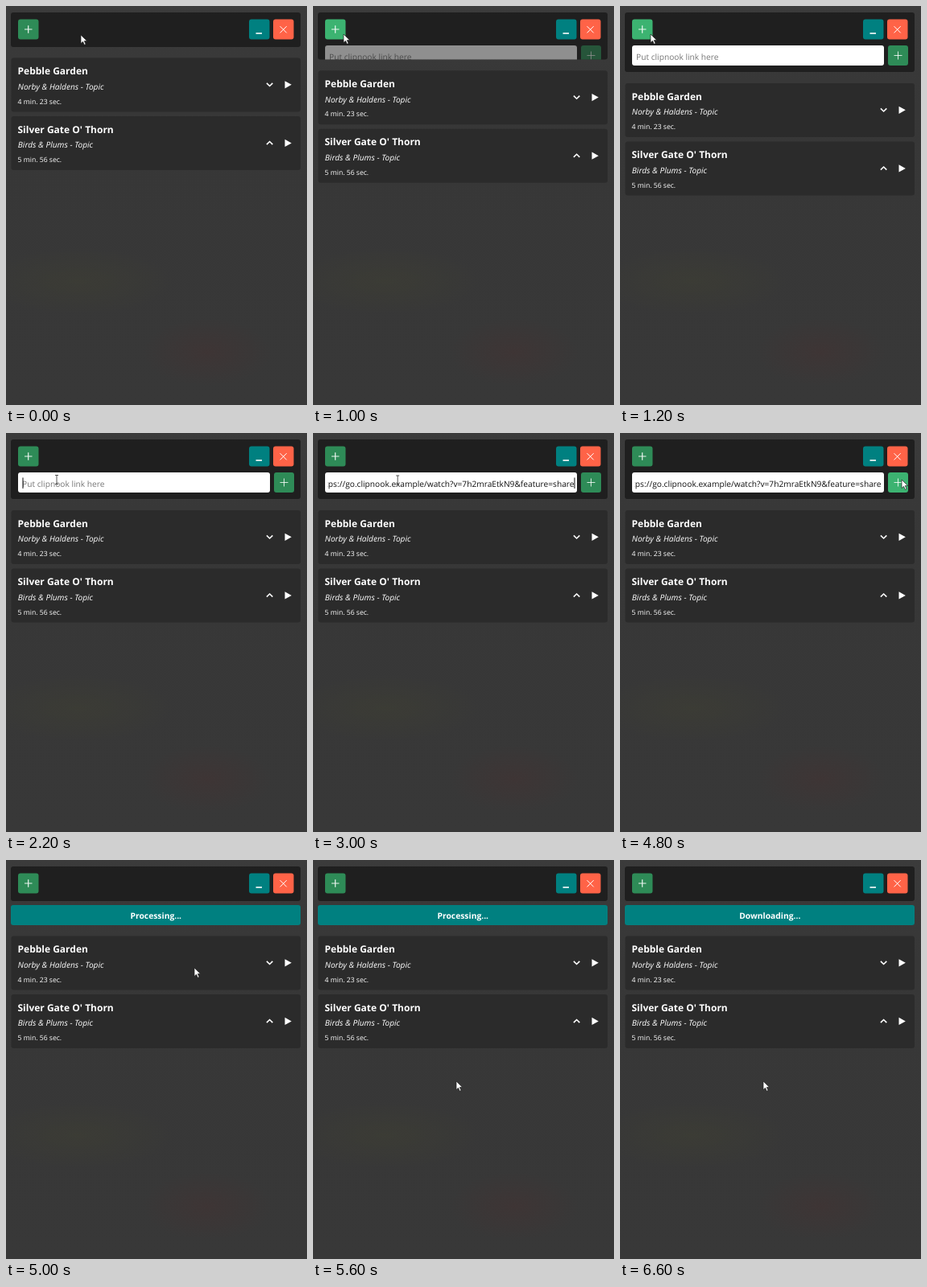
An HTML page that plays this animation: 374 by 496 pixels, repeating every 8 s.

```html
<!DOCTYPE html>
<html lang="en">
<head>
<meta charset="utf-8">
<title>Playlist</title>
<style>
  html, body { margin: 0; width: 100%; height: 100%; overflow: hidden; background: #373737; }
  svg { display: block; width: 374px; height: 496px; text-rendering: geometricPrecision;
        font-family: "Open Sans", "Noto Sans", sans-serif; }
  .line { fill: none; stroke: #fff; stroke-width: 1.2; }
  .title { font-size: 12px; font-weight: 700; }
  .artist { font-size: 10.15px; font-style: italic; }
  .time { font-size: 8.65px; }
  .field { font-size: 10.2px; }
  .banner { font-size: 10.3px; font-weight: 700; text-anchor: middle; }
</style>
</head>
<body>
<svg viewBox="0 0 374 496">
  <defs>
    <linearGradient id="shade" x1="0" y1="0" x2="0" y2="1">
      <stop offset="0" stop-color="#3b3b3b"/>
      <stop offset=".25" stop-color="#373737"/>
      <stop offset="1" stop-color="#383838"/>
    </linearGradient>
    <radialGradient id="olive">
      <stop stop-color="#44452f" stop-opacity=".3"/>
      <stop offset="1" stop-color="#44452f" stop-opacity="0"/>
    </radialGradient>
    <radialGradient id="red">
      <stop stop-color="#4c2e2e" stop-opacity=".3"/>
      <stop offset="1" stop-color="#4c2e2e" stop-opacity="0"/>
    </radialGradient>
    <clipPath id="inBar"><rect id="barClip" x="6" y="8" width="360"/></clipPath>
    <clipPath id="inField"><rect x="18.5" y="50" width="308" height="23"/></clipPath>
  </defs>

  <rect width="374" height="496" fill="url(#shade)"/>
  <ellipse cx="90" cy="342" rx="120" ry="42" fill="url(#olive)"/>
  <ellipse cx="250" cy="430" rx="80" ry="42" fill="url(#red)"/>

  <rect id="bar" x="6" y="8" width="360" rx="3" fill="#1f1f1f"/>
  <rect id="add" x="15" y="16.5" width="25.5" height="25" rx="3"/>
  <path class="line" opacity=".9" d="M23 29h9.500M27.700 24.300v9.500"/>
  <rect x="302" y="16.5" width="25.5" height="25" rx="3" fill="#008080"/>
  <path class="line" style="stroke-width:1.6" d="M310.500 34h7.500"/>
  <rect x="332" y="16.5" width="25.5" height="25" rx="3" fill="#ff6347"/>
  <path class="line" style="stroke-width:1" d="M340.500 25.200l8.200 8.200m0-8.200l-8.200 8.200"/>

  <g id="form" clip-path="url(#inBar)">
    <rect x="15" y="49" width="313" height="25" rx="3" fill="#fff"/>
    <text id="hint" class="field" x="20" y="66.7" fill="#777">Put clipnook link here</text>
    <g clip-path="url(#inField)">
      <text id="link" class="field" x="324.5" y="66.7" fill="#111" text-anchor="end">https://go.clipnook.example/watch?v=7h2mraEtkN9&amp;feature=share</text>
    </g>
    <rect id="caret" y="55.5" width="1" height="13.5" fill="#111"/>
    <rect id="send" x="333" y="49" width="25" height="25" rx="3"/>
    <path class="line" style="stroke-width:1" opacity=".8" d="M340.500 61.500h10m-5-5v10"/>
  </g>

  <g id="status">
    <rect x="6" y="56" width="360" height="25" rx="3" fill="#008080"/>
    <text id="note" class="banner" x="186.3" y="72.8" fill="#fff"></text>
  </g>

  <g id="list"></g>

  <path id="arrow" d="M0 0v10.600l2.500-2.300 1.800 4 1.800-.8-1.800-3.900h3.400z" fill="#fff" stroke="#222" stroke-width=".7"/>
  <path id="beam" d="M-2-5.500h4m-2 0v11m-2 0h4" fill="none" stroke="#444" stroke-width=".9"/>
</svg>
<script>
const LOOP = 8000, STEP = 200;
const GREEN = '#2e8b57', BRIGHT = '#3cb371';
const $ = id => document.getElementById(id);
const set = (id, name, value) => $(id).setAttribute(name, value);
const show = (id, on) => set(id, 'opacity', +on);

// Smooth progress from 0 to 1 between two times
function ease(t, from, to) {
  const p = Math.min(1, Math.max(0, (t - from) / (to - from)));
  return p * p * (3 - 2 * p);
}

const songs = [
  { title: 'Pebble Garden', artist: 'Norby &amp; Haldens', time: '4 min. 23 sec.', turn: 1 },
  { title: "Silver Gate O' Thorn", artist: 'Birds &amp; Plums', time: '5 min. 56 sec.', turn: -1 }
];
$('list').innerHTML = songs.map((s, i) => `
  <g transform="translate(0 ${i * 72.6})" fill="#fff">
    <rect x="6.5" y="64.5" width="359.5" height="67" rx="3" fill="#2b2b2b"/>
    <text class="title" x="14.5" y="85">${s.title}</text>
    <text class="artist" x="14.8" y="103.8">${s.artist} - Topic</text>
    <text class="time" x="14.5" y="121.7">${s.time}</text>
    <path class="line" style="stroke-width:1.6" transform="translate(327.6 97.7) scale(1 ${s.turn})" d="M-3.7-1.8L0 1.8l3.700-3.600"/>
    <path d="M346.500 93.200v9.200l8.300-4.600z"/>
  </g>`).join('');

// Where the pointer rests, and when it travels there
const home = { x: 93, y: 36 };
const moves = [
  { from: 200, to: 800, x: 38, y: 35 },
  { from: 1400, to: 2200, x: 63, y: 58 },
  { from: 2800, to: 3600, x: 333, y: 61 },
  { from: 3600, to: 4000, x: 364, y: 66 },
  { from: 4000, to: 4400, x: 350, y: 58 },
  { from: 4800, to: 5000, x: 234, y: 134 },
  { from: 5000, to: 5600, x: 178, y: 275 }
];

function pointer(t) {
  let { x, y } = home;
  for (const m of moves) {
    const p = ease(t, m.from, m.to);
    x += (m.x - x) * p;
    y += (m.y - y) * p;
  }
  return { x, y };
}

function draw(t) {
  const busy = t >= 5000, pasted = t >= 3000;
  const open = busy ? 0 : ease(t, 800, 1200);
  const { x, y } = pointer(t);
  const over = (l, top, r, b) => x >= l && x <= r && y >= top && y <= b;
  const typing = open === 1 && over(15, 49, 328, 74);

  for (const id of ['bar', 'barClip']) set(id, 'height', 43 + 31 * open);
  set('list', 'transform', `translate(0 ${busy ? 30 : 31.5 * open})`);
  set('add', 'fill', over(15, 16, 40, 42) ? BRIGHT : GREEN);
  set('send', 'fill', over(338, 49, 358, 74) ? BRIGHT : GREEN);

  show('form', open);
  show('hint', !pasted);
  show('link', pasted);
  set('caret', 'x', pasted ? 324.5 : 20.5);
  show('caret', (t >= 2200 && t < 2600) || (pasted && t < 4000));

  // The note dims, changes its word and lights up again
  show('status', busy);
  $('note').textContent = t < 6200 ? 'Processing...' : 'Downloading...';
  show('note', 0.3 + 0.7 * Math.min(1, Math.abs(t - 6200) / 400));

  for (const id of ['arrow', 'beam']) {
    set(id, 'transform', `translate(${x} ${y})`);
    show(id, (id === 'beam') === typing);
  }
}

const start = performance.now();
function tick() {
  const t = (performance.now() - start) % LOOP;
  draw(Math.floor(t / STEP) * STEP);
  requestAnimationFrame(tick);
}
tick();
</script>
</body>
</html>
```
